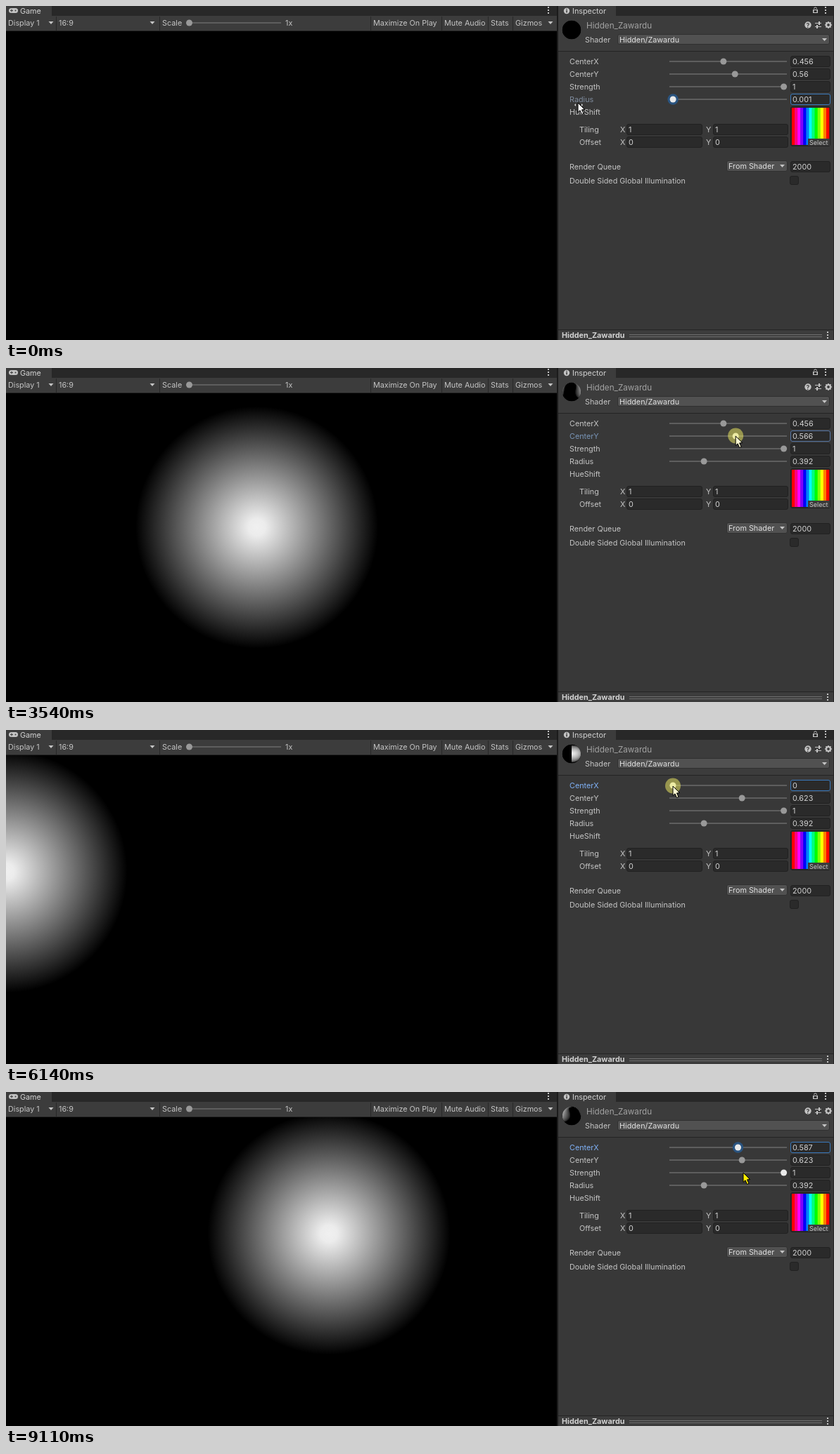
These frames come from a looping animation (1177x476 px, 9.9 s). An HTML page with a canvas:

```html
<!DOCTYPE html>
<html lang="en">
<head>
<meta charset="utf-8">
<title>Material inspector</title>
<style>
html, body { margin: 0; width: 100%; height: 100%; overflow: hidden; background: #000; }
canvas { display: block; width: 100%; height: 100%; }
</style>
</head>
<body>
<canvas id="stage" width="1177" height="476"></canvas>
<script>
const ctx = document.getElementById('stage').getContext('2d');
const LOOP = 9900, TEXT = '#c4c4c4', BRIGHT = '#d2d2d2', PANEL = '#383838', BAR = '#3c3c3c', DARK = '#282828';
const VIEW = { y: 36, w: 782, h: 440 };
const ROW_HEIGHT = 18;
const INPUT_LEAD = 8; // the sliders trail the pointer and the view by this many ms

const rowY = index => 79 + index * ROW_HEIGHT;
const knobX = ratio => 948 + 157.6 * ratio;

// Progress from 0 to 1 between two times, easing in and out
function ease(t, from, to) {
  const p = Math.min(1, Math.max(0, (t - from) / (to - from)));
  return p * p * (3 - 2 * p);
}
const mix = (a, b, p) => a + (b - a) * p;

function valuesAt(t) {
  let x = .456, y = t < 3540 ? .56 : .566;
  const radius = mix(.001, .392, ease(t, 1690, 2320));
  y = mix(y, .1, ease(t, 3540, 4300));
  y = mix(y, .623, ease(t, 4300, 5000));
  x = mix(x, 0, ease(t, 5680, 6140));
  x = mix(x, 1, ease(t, 6340, 7068));
  x = mix(x, .941, ease(t, 7600, 7710));
  x = mix(x, .587, ease(t, 7710, 8380));
  return { x, y, radius };
}

// The pointer glides from knob to knob and stays on the one it reached
function pointerAt(t) {
  const { x, y, radius } = valuesAt(t + INPUT_LEAD);
  const pos = { x: 813, y: 138 };
  const glide = (from, to, targetX, targetY) => {
    const p = ease(t, from, to);
    pos.x = mix(pos.x, targetX, p);
    pos.y = mix(pos.y, targetY, p);
  };
  glide(260, 1230, knobX(radius / 1.4), rowY(3));
  glide(2800, 3270, knobX(y), rowY(1));
  glide(5100, 5600, knobX(x), rowY(0) + 1);
  glide(8430, 9110, 1048, rowY(2));
  return pos;
}

const isPressed = t => (t >= 1500 && t < 2800) || (t >= 3540 && t < 5100) || (t >= 5680 && t < 8430);
const focusedRow = t => t < 3540 ? 3 : t < 5680 ? 1 : 0;

function rect(x, y, w, h, color) {
  ctx.fillStyle = color;
  ctx.fillRect(x, y, w, h);
}
function box(x, y, w, h, fill = '#2a2a2a', border = '#212121') {
  ctx.beginPath();
  ctx.roundRect(x + .5, y + .5, w - 1, h - 1, 2.5);
  ctx.fillStyle = fill;
  ctx.fill();
  ctx.strokeStyle = border;
  ctx.lineWidth = 1;
  ctx.stroke();
}
function disc(x, y, r, color) {
  ctx.beginPath();
  ctx.arc(x, y, r, 0, 7);
  ctx.fillStyle = color;
  ctx.fill();
}
function arc(x, y, r, width, from = 0, to = 7) {
  ctx.beginPath();
  ctx.arc(x, y, r, from, to);
  ctx.strokeStyle = TEXT;
  ctx.lineWidth = width;
  ctx.stroke();
}
function poly(points, color) {
  ctx.beginPath();
  points.forEach(([x, y]) => ctx.lineTo(x, y));
  ctx.closePath();
  ctx.fillStyle = color;
  ctx.fill();
}
// y is the vertical middle of the capitals
function label(text, x, y, color = TEXT, size = 10.8, weight = 400) {
  ctx.font = `${weight} ${size}px Inter, sans-serif`;
  ctx.fillStyle = color;
  ctx.fillText(text, x, y + 4);
}
function field(x, y, w, text, border) {
  box(x, y - 8, w, 16, undefined, border);
  label(text, x + 3, y, BRIGHT);
}
function dropdown(x, y, w, h, text) {
  box(x, y, w, h, '#515151', '#303030');
  label(text, x + 3, y + 7.5, '#e0e0e0');
  caret(x + w - 7.5, y + 8);
}
const caret = (x, y) => poly([[x - 3.5, y - 2], [x + 3.5, y - 2], [x, y + 2]], TEXT);
const kebab = (x, y) => { for (let d = -4; d <= 4; d += 4) rect(x - 1, y + d - 1, 2, 2, TEXT); };

function drawGamePanel() {
  rect(0, 0, 783, 14, DARK);
  rect(0, 0, 65, 15, BAR);
  rect(0, 14, 783, 21, BAR);
  rect(0, 35, 783, 1, '#232323');
  ctx.beginPath();
  ctx.roundRect(4, 3, 13, 7, 3.5);
  ctx.fillStyle = TEXT;
  ctx.fill();
  rect(6, 6, 4, 1, BAR);
  rect(7.5, 4.5, 1, 4, BAR);
  disc(13.5, 6.5, 1, BAR);
  label('Game', 20, 7, BRIGHT);
  kebab(771, 6);

  // Each toolbar item starts after a separator
  const item = (text, x) => {
    rect(x - 4, 15, 1, 20, DARK);
    label(text, x, 24);
  };
  label('Display 1', 3, 24);
  item('16:9', 75);
  item('Scale', 222);
  label('1x', 397, 24);
  item('Maximize On Play', 522);
  item('Mute Audio', 623);
  item('Stats', 689);
  item('Gizmos', 724);
  caret(64, 24);
  caret(208, 24);
  caret(774, 24);
  rect(260, 23, 131, 2, '#5e5e5e');
  disc(260.5, 24, 4.5, '#999');
}

function drawSpot({ x: cx, y: cy, radius }) {
  const x = cx * VIEW.w, y = VIEW.y + (1 - cy) * VIEW.h, r = radius * VIEW.h;
  if (r < 1) return;
  ctx.save();
  ctx.beginPath();
  ctx.rect(0, VIEW.y, VIEW.w, VIEW.h);
  ctx.clip();
  const glow = ctx.createRadialGradient(x, y, 0, x, y, r);
  glow.addColorStop(0, '#f0f0f0');
  glow.addColorStop(.07, '#ececec');
  glow.addColorStop(1, '#000');
  disc(x, y, r, glow);
  ctx.restore();
}

// The same shader wrapped around a small sphere seen slightly from above
function drawPreview({ x: cx, y: cy, radius }) {
  const size = 13.2, tilt = .35, sin = Math.sin(tilt), cos = Math.cos(tilt);
  ctx.save();
  disc(804, 34, size, '#000');
  ctx.clip();
  for (let j = -13; j < 13; j++) for (let i = -13; i < 13; i++) {
    const x = (i + .5) / size, y = -(j + .5) / size;
    const z = Math.sqrt(Math.max(0, 1 - x * x - y * y));
    const longitude = Math.atan2(x, z * cos - y * sin);
    const latitude = Math.asin(Math.max(-1, Math.min(1, y * cos + z * sin)));
    const u = (1 + longitude / (2 * Math.PI)) % 1, v = .5 + latitude / Math.PI;
    const light = Math.max(0, 1 - Math.hypot(u - cx, v - cy) / radius);
    const level = Math.round(245 * light ** .6);
    rect(804 + i, 34 + j, 1, 1, `rgb(${level},${level},${level})`);
  }
  ctx.restore();
}

function drawIcons() {
  disc(797, 7, 4.2, TEXT);
  rect(796.3, 6, 1.5, 3.5, PANEL);
  rect(796.3, 4, 1.5, 1.2, PANEL);

  rect(1147, 5, 7, 5, TEXT);
  rect(1148.5, 6, 4, 3, DARK);
  arc(1150.5, 4, 2, 1, Math.PI, 2 * Math.PI);
  kebab(1165, 6);

  disc(1140, 27, 4.7, TEXT);
  label('?', 1137.4, 26.6, BAR, 8.5, 700);
  for (let i = 0; i < 2; i++) {
    rect(1150, 24 + 5 * i, 9, 1, TEXT);
    rect(1155 - 3 * i, 22 + 5 * i, 2, 5, TEXT);
  }
  for (let a = 0; a < 6; a += Math.PI / 4) disc(1169 + 4 * Math.cos(a), 27 + 4 * Math.sin(a), 1.1, TEXT);
  arc(1169, 27, 2.9, 2);
}

function drawTexture() {
  const bands = 13, width = 53 / bands;
  box(1115, 143, 57, 57);
  for (let i = 0; i < bands; i++) {
    rect(1117 + i * width, 145, width + .3, 53, `hsl(${360 * (1 - i / (bands - 1))},100%,50%)`);
  }
  rect(1140, 189, 31, 10, BAR);
  label('Select', 1142, 194, TEXT, 9);
}

function drawVector(name, y, value) {
  label(name, 815, y);
  label('X', 873, y);
  field(882, y, 108, value);
  label('Y', 995, y);
  field(1005, y, 107, value);
}

function drawInspector() {
  rect(783, 0, 2, 476, '#1c1c1c');
  rect(785, 0, 392, 476, PANEL);
  rect(785, 0, 392, 14, DARK);
  rect(785, 0, 82, 14, BAR);
  rect(785, 14, 392, 50, BAR);
  rect(785, 64, 392, 1, '#242424');
  label('Inspector', 805, 7, BRIGHT);
  drawIcons();
  label('Hidden_Zawardu', 825, 28, '#a2a2a2', 11.7);
  label('Shader', 823, 48);
  dropdown(869, 40, 302, 15, ' Hidden/Zawardu'.trim());

  label('HueShift', 801, rowY(4));
  drawTexture();
  drawVector('Tiling', 176, '1');
  drawVector('Offset', 194, '0');

  label('Render Queue', 801, 229);
  dropdown(1024, 220, 87, 16, 'From Shader');
  field(1115, 229, 57, '2000');
  label('Double Sided Global Illumination', 801, 249);
  box(1114, 242, 13, 13);

  rect(785, 461, 391, 1, '#232323');
  rect(785, 462, 391, 14, BAR);
  label('Hidden_Zawardu', 790, 469, BRIGHT, 10.8, 700);
  rect(886, 468, 274, 1, '#707070');
  rect(886, 471, 274, 1, '#707070');
  kebab(1168, 469);
  rect(1176, 0, 1, 476, '#232323');
}

function drawSlider({ name, value, max = 1, tint, border }, y, { focused, hovered, pressed }) {
  const x = knobX(value / max);
  label(name, 801, y, focused ? tint : TEXT);
  rect(943, y - 1, 167, 2, '#5e5e5e');
  if (focused && !pressed) disc(x, y, 7.7, '#2a5480');
  disc(x, y, 4.5, focused || hovered ? '#eaeaea' : '#999');
  field(1115, y, 57, String(+value.toFixed(3)), focused ? border : undefined);
}

function drawPointer({ x, y }, pressed) {
  const overLabel = !pressed && x < 938;
  if (pressed) disc(x, y - .5, 11, 'rgba(240,235,100,.52)');
  ctx.save();
  ctx.translate(x, y);
  poly([[0, 0], [0, 13.5], [3, 10.8], [5.5, 16.5], [8, 15.4], [5.5, 9.9], [9.6, 9.6]],
    pressed ? '#fffbd2' : overLabel ? '#f4f4f4' : '#ffee00');
  ctx.strokeStyle = '#000';
  ctx.lineWidth = 1;
  ctx.lineJoin = 'round';
  ctx.stroke();
  if (overLabel) {
    for (const side of [-1, 1]) poly([[1 + side * 6, 3], [1 + side * 4, 1], [1 + side * 4, 5]], '#ddd');
  }
  ctx.restore();
}

function render(t) {
  const shown = valuesAt(t), live = valuesAt(t + INPUT_LEAD);
  const pointer = pointerAt(t), pressed = isPressed(t);
  const rows = [
    { name: 'CenterX', value: shown.x, tint: '#7fb0f5', border: '#3a79bb' },
    { name: 'CenterY', value: shown.y, tint: '#7894b6', border: '#5877a5' },
    { name: 'Strength', value: 1 },
    { name: 'Radius', value: shown.radius, max: 1.4, tint: '#7f8c9e', border: '#3a79bb' }
  ];

  rect(0, 0, 1177, 476, '#000');
  drawSpot(live);
  drawGamePanel();
  drawInspector();
  drawPreview(live);
  rows.forEach((row, i) => drawSlider(row, rowY(i), {
    focused: i === focusedRow(t),
    hovered: !pressed && pointer.x > 942 && Math.abs(pointer.y - rowY(i)) < ROW_HEIGHT / 2,
    pressed
  }));
  drawPointer(pointer, pressed);
}

const start = performance.now();
function tick() {
  render((performance.now() - start) % LOOP);
  requestAnimationFrame(tick);
}
tick();
</script>
</body>
</html>
```
